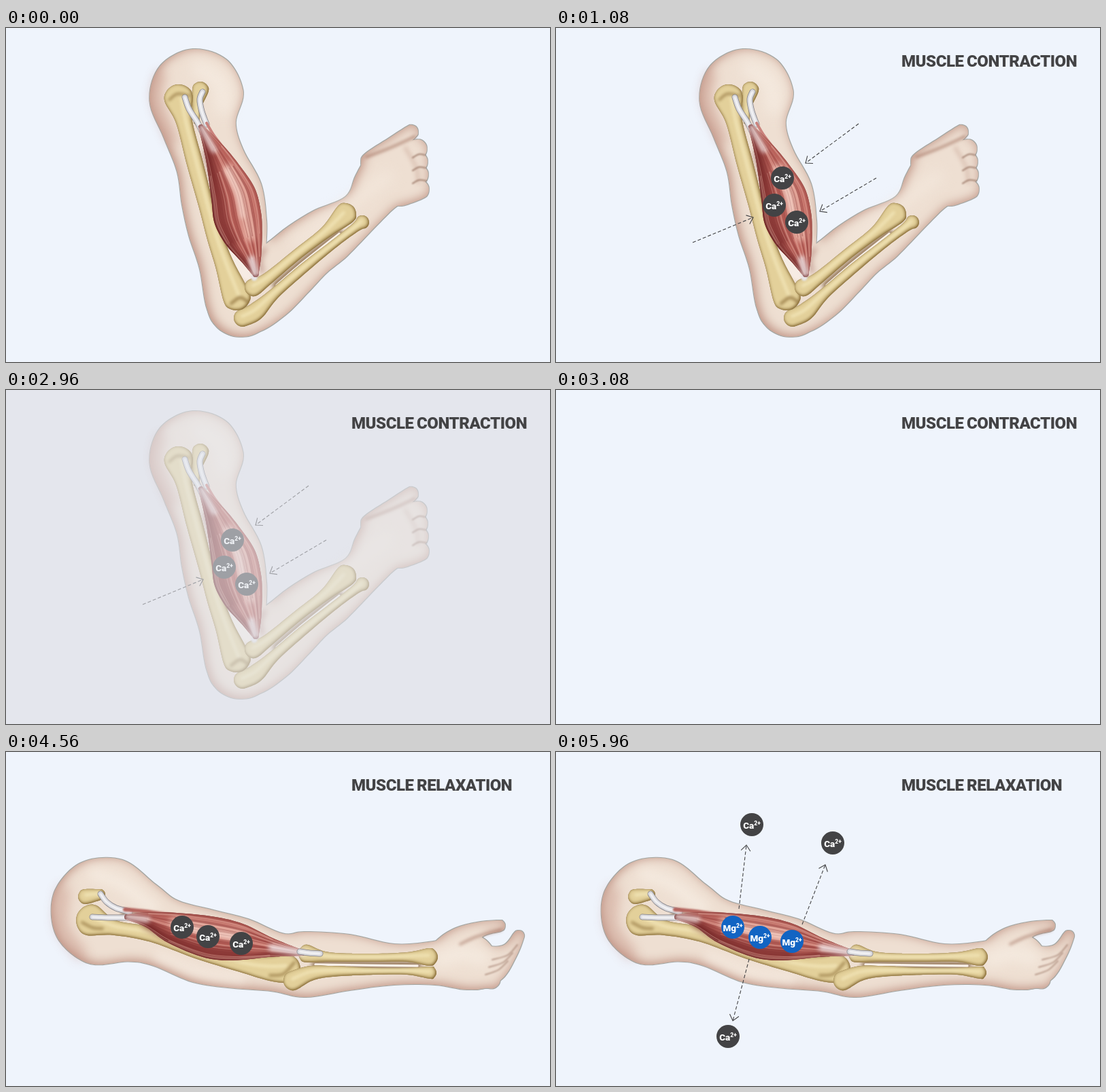
Animation, 800 px wide and 492 px high, one loop 8 s. Source, as an HTML page:

```html
<!DOCTYPE html>
<html lang="en">
<head>
<meta charset="utf-8">
<title>Muscle contraction and relaxation</title>
<style>
html, body { margin: 0; width: 100%; height: 100%; overflow: hidden; background: #eff4fc; }
svg, .scene { position: absolute; left: 0; top: 0; width: 800px; height: 492px; will-change: opacity; }
text { font: 800 24px Roboto, "Open Sans", sans-serif; fill: #434345; letter-spacing: -.45px; word-spacing: -1px; }
.ion text { font-size: 13.5px; fill: #fff; letter-spacing: 0; text-anchor: middle; }
.ion tspan { font-size: 8.5px; }
</style>
</head>
<body>
<svg id="defs"></svg>
<div class="scene" id="bent"></div>
<div class="scene" id="straight"></div>
<svg viewBox="0 0 800 492">
  <text id="title1" x="508" y="57">MUSCLE CONTRACTION</text>
  <text id="title2" x="508" y="57">MUSCLE RELAXATION</text>
</svg>
<script>
const $ = id => document.getElementById(id);
const points = s => s.split(' ').map(p => p.split(',').map(Number));

// Smooth path through points (Catmull-Rom).
function curve(pts, closed) {
  const n = pts.length;
  const at = i => pts[closed ? (i + n) % n : Math.max(0, Math.min(n - 1, i))];
  let d = 'M' + pts[0].slice(0, 2);
  for (let i = 0; i < (closed ? n : n - 1); i++) {
    const [a, b, c, e] = [at(i - 1), at(i), at(i + 1), at(i + 2)];
    const out = [0, 1].map(k => b[k] + (c[k] - a[k]) / 6);
    const into = [0, 1].map(k => c[k] - (e[k] - b[k]) / 6);
    d += `C${[...out, ...into, c[0], c[1]].map(v => v.toFixed(1))}`;
  }
  return d;
}

function line(pts, color, width, blur = 0, alpha = 1) {
  const d = curve(typeof pts === 'string' ? points(pts) : pts);
  return `<path d="${d}" fill="none" stroke="${color}" stroke-width="${width}" stroke-linecap="round"
    opacity="${alpha}" ${blur ? `style="filter:blur(${blur}px)"` : ''}/>`;
}

// A limb given by stations x,y,radius; side(f) runs along it at f radii from the middle.
function tube(stations) {
  const s = points(stations), last = s.length - 1;
  const dirs = s.map((p, i) => {
    const a = s[Math.max(0, i - 1)], b = s[Math.min(last, i + 1)];
    const len = Math.hypot(b[0] - a[0], b[1] - a[1]);
    return [(b[0] - a[0]) / len, (b[1] - a[1]) / len];
  });
  const offset = (i, along, across) => {
    const [x, y, r] = s[i], [u, v] = dirs[i];
    return [x + r * (u * along - v * across), y + r * (v * along + u * across)];
  };
  const side = f => s.map((p, i) => offset(i, 0, f));
  const cap = (i, sign) => [.785, 0, -.785].map(a => offset(i, sign * Math.cos(a), sign * Math.sin(a)));
  const d = curve([...side(1), ...cap(last, 1), ...side(-1).reverse(), ...cap(0, -1)], true);
  return { d, side };
}

// Rounded look: an outline around the shape and a soft shade inside it.
const volume = (id, edge, shade, blur, dx, dy, radius, strength) => `<filter id="${id}" color-interpolation-filters="sRGB">
  <feMorphology in="SourceAlpha" operator="dilate" radius="${radius}"/><feGaussianBlur stdDeviation=".4" result="grown"/>
  <feFlood flood-color="${edge}"/><feComposite operator="in" in2="grown" result="edge"/>
  <feGaussianBlur in="SourceAlpha" stdDeviation="${blur}"/><feOffset dx="${dx}" dy="${dy}" result="soft"/>
  <feFlood flood-color="${shade}" flood-opacity="${strength}"/><feComposite operator="out" in2="soft"/>
  <feComposite operator="in" in2="SourceAlpha" result="shade"/>
  <feMerge><feMergeNode in="edge"/><feMergeNode in="SourceGraphic"/><feMergeNode in="shade"/></feMerge></filter>`;
$('defs').innerHTML = volume('skin', '#a3a5a1', '#b07c6c', 8, 3, -2, .7, .85) +
  volume('bone', '#7d6634', '#6b4c17', 2.6, -.8, -.8, .4, 1) +
  volume('muscle', '#804040', '#561416', 6, 4, -2, .3, 1);

const solid = (kind, color, ...tubes) => `<g filter="url(#${kind})" fill="${color}">
  ${tubes.map(t => `<path d="${t.d}"/>`).join('')}</g>`;
const skin = (...limbs) => solid('skin', '#eedfd2', ...limbs.map(tube));

function bone(stations) {
  const t = tube(stations);
  return solid('bone', '#e3d09a', t) + line(t.side(-.2), '#f6ebc0', 4, 2, .8);
}

const tendon = pts => line(pts, '#807e84', 9, .5) + line(pts, '#d3d3d8', 7.5) + line(pts, '#fafafc', 3, 1);

function muscle(stations) {
  const t = tube(stations);
  let seed = 7, fibres = '';
  const rnd = () => (seed = seed * 16807 % 2147483647) / 2147483647;
  for (let f = -.9; f < .92; f += .06) {
    const from = Math.floor(rnd() * 3), path = t.side(f + rnd() * .04).slice(from, from + 6);
    const dark = rnd() < .55 + f / 3;
    fibres += line(path, dark ? '#7d2a2a' : '#f3c0b2', 1 + rnd() * 1.5, .7, .15 + rnd() * .25);
  }
  const middle = t.side(0);
  return solid('muscle', '#bd655d', t) +
    line(t.side(.6).slice(1, -2), '#6b1f20', 12, 5, .6) +
    line(t.side(-.35).slice(2, -2), '#f3c4b6', 15, 5, .9) + fibres +
    line(t.side(-.2).slice(2, 5), '#fbe6dd', 5, 3, .8) +
    line(middle.slice(0, 2), '#efe4e4', 8, 3, .85) + line(middle.slice(-2), '#efe8ea', 9, 3, .9);
}

const gap = pts => line(pts, '#80603f', 12, 3, .8) + line(pts, '#f8f0e9', 3.5, .6);

function arrow(x1, y1, x2, y2) {
  const a = Math.atan2(y2 - y1, x2 - x1);
  const barb = s => [x2 - 11 * Math.cos(a + s), y2 - 11 * Math.sin(a + s)];
  return `<g fill="none" stroke="#434345" stroke-width="1.1"><path d="M${x1},${y1}L${x2},${y2}" stroke-dasharray="5 3"/>
    <path d="M${barb(.68)}L${x2},${y2}L${barb(-.68)}"/></g>`;
}

const ion = (name, [x, y], color) => `<g class="ion" transform="translate(${x} ${y})">
  <circle r="17" fill="${color}"/><text y="5.5">${name}<tspan dy="-5">2+</tspan></text></g>`;
const calcium = p => ion('Ca', p, '#434345');
const magnesium = p => ion('Mg', p, '#1264c3');
const svg = body => `<svg viewBox="0 0 800 492">${body}</svg>`;
const repeat = (n, make) => Array.from({ length: n }, (_, i) => make(i)).join('');

const bentArm =
  skin('280,100,69 285,150,54 300,195,51 317,245,60 326,295,58 334,345,50 346,404,51',
    '346,404,51 380,382,51 414,353,47 444,326,44 478,302,41 521,271,31 543,241,37 566,217,44',
    '540,199,18 572,172,13 596,153,10',
    ...[178, 197, 216, 238].map((y, i) => `580,${y + 8},16 ${605 + i},${y},14`)) +
  line('228,70 222,105 245,165', '#bd8273', 14, 8, .45) +
  line('285,60 315,80 320,115', '#f7eee4', 26, 10, .7) +
  line('430,315 490,270 560,220', '#f5eadf', 20, 9, .6) +
  line('530,190 566,176 601,160', '#a87a68', 4, 2, .7) +
  line('587,176 603,205 606,228', '#bd9483', 4, 3, .5) +
  repeat(3, i => line(`${616 + i},${187 + 19 * i} 607,${186 + 19 * i} 598,${191 + 19 * i}`, '#94705f', 2, .8, .8)) +
  line('380,326 373,342 376,358', '#a9746a', 7, 4, .6) +
  line('330,325 340,344 355,364', '#f6ece4', 16, 2) +
  gap('398,379 430,351 490,303') +
  bone('348,427,13 368,417,13 395,391,8 440,352,7 485,316,6 515,293,7 524,286,10') +
  bone('286,91,12 281,115,7 280,138,4') +
  bone('254,104,21 262,138,12 278,200,12 294,260,11 308,310,12 322,350,14 339,396,20') +
  line('240,106 252,97 270,100', '#80602b', 3, 2, .7) +
  line('331,406 344,397 355,403', '#80602b', 4, 2, .7) +
  bone('364,382,13 385,369,9 430,332,8 470,301,9 499,274,16') +
  tendon('263,102 269,119 281,138 291,158') + tendon('289,94 285,105 288,123 295,142') +
  line('295,140 307,160 326,184', '#c9807a', 4, .7) +
  line('369,345 366,358 365,368', '#e6e3e6', 9, 1) +
  muscle('287,146,4 306,180,15 320,210,24 334,245,33 341,280,35 350,310,28 361,340,15 367,362,5');

const straightArm =
  skin('146,235,80 200,252,60 235,267,51 290,286,55 345,297,52 400,310,43 440,313,48 505,310,41 570,313,30 630,311,32 680,309,41',
    '690,312,38 720,310,26 742,292,12 754,271,8',
    '650,295,24 672,276,20 698,261,11 726,256,8',
    '690,325,26 712,334,15') +
  line('85,205 82,255 110,297', '#bd8273', 16, 9, .45) +
  line('130,180 170,195 215,230', '#f7eee4', 20, 8, .7) +
  line('225,301 280,323 345,334', '#f6ebe1', 14, 7, .7) +
  line('640,305 670,297 700,303', '#f7eee4', 24, 9, .7) +
  line('668,283 692,272 728,262', '#a97c6b', 4, 2, .6) +
  repeat(3, i => line(`${752 - 7 * i},${284 + 12 * i} ${738 - 7 * i},${299 + 11 * i} ${715 - 5 * i},${306 + 11 * i}`,
    '#9d7969', 2, .9, .65)) +
  gap('455,313 520,314 605,315') +
  bone('126,248,23 160,259,11 215,269,11 280,293,11 345,312,12 385,319,17 412,319,21') +
  bone('117,213,11 138,210,8') +
  line('112,251 128,259 142,260', '#80602b', 4, 2, .6) +
  line('388,329 408,327 424,310', '#80602b', 4, 2, .6) +
  bone('422,337,14 448,326,11 480,323,8 540,323,5 590,323,5 624,325,9') +
  bone('443,297,13 475,302,7 540,303,6 590,302,7 622,302,13') +
  line('172,238 200,240 230,247', '#674a2b', 6, 2, .6) +
  tendon('139,209 148,221 162,230 182,235') + tendon('127,243 150,244 185,244') +
  line('175,232 205,235 240,240', '#b4635c', 6, 1) +
  muscle('178,243,4 208,247,11 245,259,23 300,273,31 345,280,27 390,288,14 436,296,4') +
  tendon('432,294 446,296 462,297');

const caIn = [[259, 258], [297, 272], [346, 282]], caOut = [[288, 107], [253, 419], [407, 134]];
$('bent').innerHTML = svg(bentArm) + svg(`<g id="signs">
  ${arrow(445, 141, 367, 199)}${arrow(471, 221, 388, 270)}${arrow(201, 316, 290, 279)}
  ${[[333, 221], [321, 261], [354, 286]].map(calcium).join('')}</g>`);
$('straight').innerHTML = svg(straightArm) + svg(`<g id="exits">
  ${arrow(269, 231, 280, 137)}${arrow(362, 254, 396, 166)}${arrow(284, 305, 260, 396)}</g>
  <g id="mg">${[[260, 258], [300, 273], [347, 279]].map(magnesium).join('')}</g>
  <g id="ca">${caIn.map(calcium).join('')}</g>`);

function draw() {
  const t = Math.floor(performance.now() % 8000 / 40) * 40;
  const ramp = (a, b) => Math.max(0, Math.min(1, (t - a) / (b - a)));
  const fade = (id, v) => $(id).style.opacity = v;

  fade('title1', ramp(120, 600) - ramp(3160, 3400));
  fade('signs', ramp(520, 960));
  fade('bent', 1 - ramp(2800, 3080));
  fade('title2', ramp(3560, 4040));
  fade('straight', ramp(4160, 4560));
  fade('exits', ramp(5280, 5680));
  fade('mg', ramp(5520, 5960));

  const u = ramp(5120, 5640), ease = u * u * (3 - 2 * u);
  [...$('ca').children].forEach((g, i) => {
    const [x, y] = caIn[i].map((v, k) => v + (caOut[i][k] - v) * ease);
    g.setAttribute('transform', `translate(${x} ${y})`);
  });

  // Brief grey dip of the background while the first arm leaves.
  const grey = t < 2840 ? 0 : 1 - ramp(2840, 3080);
  document.body.style.background = `rgb(${[239 - 23 * grey, 244 - 29 * grey, 252 - 30 * grey]})`;
  requestAnimationFrame(draw);
}
draw();
</script>
</body>
</html>
```
